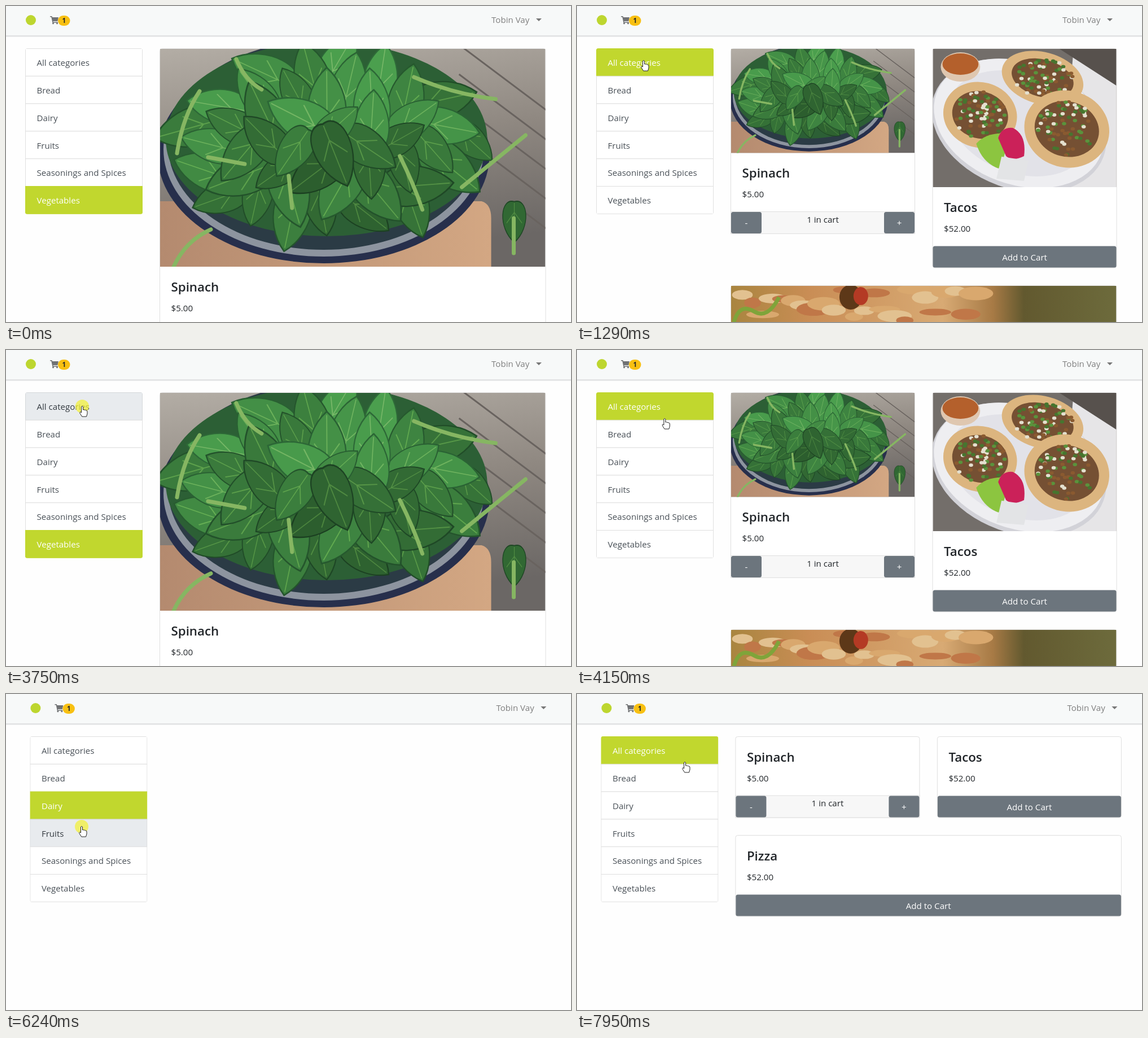
An HTML page that plays this animation: 1001x560 px, repeating every 8 s.

```html
<!DOCTYPE html>
<html lang="en">
<head>
<meta charset="utf-8">
<title>Shop categories</title>
<style>
html, body { margin: 0; width: 100%; height: 100%; overflow: hidden; background: #fefefe; }
svg { display: block; }
#stage { width: 1001px; height: 560px; }
text { font: 15.1px "Open Sans", "Noto Sans", sans-serif; fill: #212529; }
.title { font-size: 22.3px; font-weight: 600; }
.mid { text-anchor: middle; }
.btn rect { fill: #6c757d; }
.btn text { fill: #fff; }
.card { fill: #fff; stroke: #dfdfdf; }
.row rect { fill: #fff; stroke: #dfdfdf; }
.row text { fill: #495057; }
.row.hover rect { fill: #e8ebee; stroke: #d5d8db; }
.row.hover text { fill: #343a40; }
.row.on rect { fill: #c1d72e; stroke: #c1d72e; }
.row.on text { fill: #fff; }
.hide { display: none; }
</style>
</head>
<body>
<svg id="stage" viewBox="0 0 1001 560">
  <defs>
    <clipPath id="listClip"><rect x="34" y="75" width="208" height="294" rx="4"/></clipPath>
    <linearGradient id="wood" x2=".2" y2="1">
      <stop offset="0" stop-color="#b3ada5"/><stop offset=".5" stop-color="#8f8881"/>
      <stop offset="1" stop-color="#6b6765"/>
    </linearGradient>
    <linearGradient id="board" x2="1">
      <stop offset="0" stop-color="#b48a6f"/><stop offset="1" stop-color="#d3a783"/>
    </linearGradient>
    <linearGradient id="crust">
      <stop offset="0" stop-color="#a9853f"/><stop offset=".2" stop-color="#c98d55"/>
      <stop offset=".55" stop-color="#d8aa74"/><stop offset=".68" stop-color="#a77a45"/>
      <stop offset=".76" stop-color="#62592f"/><stop offset="1" stop-color="#6d6b3c"/>
    </linearGradient>
    <path id="leaf" d="M-.9 0C-1.1-.9 .3-1.1 1 0C.3 1.1-1.1 .9-.9 0Z"/>
    <symbol id="spinach" viewBox="0 0 683 386" preserveAspectRatio="none"></symbol>
    <symbol id="tacos" viewBox="0 0 326 245" preserveAspectRatio="none"></symbol>
    <symbol id="pizza" viewBox="0 0 683 386" preserveAspectRatio="none"></symbol>
  </defs>

  <g id="page">
    <path fill="#f7f9f9" d="M-20 0H1030V52H-20z"/>
    <path fill="#e1e2e3" d="M-20 52H1030V54.5H-20z"/>
    <circle cx="44" cy="25" r="9" fill="#bdd62f"/>
    <g fill="#707274">
      <path d="M78 18h3.5l.6 2H93l-1.6 7h-8l.3 1.3H92v1.4h-9.6L80.3 19.5H78z"/>
      <circle cx="83.5" cy="30.8" r="1.5"/><circle cx="90.5" cy="30.8" r="1.5"/>
    </g>
    <rect x="92" y="17" width="21.5" height="18" rx="9" fill="#f8c012"/>
    <text class="mid" x="102.8" y="30" style="font-size:11.5px;font-weight:700">1</text>
    <text x="860" y="30" style="fill:#7f7f7f">Tobin Vay</text>
    <path fill="#777" d="M939 22h10l-5 5z"/>
    <g id="list" clip-path="url(#listClip)"></g>
    <g id="veg"></g>
    <g id="all"></g>
    <g id="bare"></g>
  </g>

  <g id="mouse">
    <circle id="click" r="12" fill="#f3f03c" fill-opacity=".75"/>
    <path id="hand" fill="#fff" stroke="#222" stroke-linejoin="round"
      d="M-1.5 0.5Q0-1.5 1.5.5V6Q3 5 4.2 6.4Q5.8 5.6 6.8 7Q8.8 6.6 9 9V13L7.5 18H-.3L-3.8 12.5Q-5 10-3.3 9.6L-1.5 11z"/>
    <path id="arrow" fill="#fff" stroke="#222" d="M0 0V16L3.8 12.5 6.3 18.3 8.8 17.2 6.4 11.6H11.5z"/>
  </g>
</svg>
<script>
const $ = id => document.getElementById(id);
const TOP = 75.5, STEP = 48.8, LEFT = 34.5, WIDTH = 207, SHIFT = 8.4, LOOP = 8000, TICK = 77;

let seed = 7;
const rand = (lo = 0, hi = 1) => lo + (hi - lo) * ((seed = seed * 16807 % 2147483647) / 2147483647);
const repeat = (n, make) => Array.from({ length: n }, (_, i) => make(i)).join('');
const oval = (x, y, rx, ry, fill, turn = 0) =>
  `<ellipse rx="${rx}" ry="${ry}" fill="${fill}" transform="translate(${x} ${y}) rotate(${turn})"/>`;

// Spinach bowl: leaves spiral inwards, lighter towards the top
const leaf = (x, y, size, turn, light) => `<g transform="translate(${x} ${y}) rotate(${turn}) scale(${size} ${size * .72})">
  <use href="#leaf" fill="hsl(122 36% ${light}%)" stroke="hsl(130 40% ${light * .65}%)" stroke-width=".05"/>
  <path d="M-.85 0H.9M-.4 0L.1-.5M-.4 0L.1 .5" fill="none" stroke="hsl(108 36% ${light + 11}%)" stroke-width=".04"/></g>`;
const heap = n => repeat(n, i => {
  const r = Math.sqrt(1 - i / n), a = i * 2.4;
  const x = 295 + 258 * r * Math.cos(a), y = 165 + 148 * r * Math.sin(a);
  return leaf(x, y, rand(48, 68), a * 57.3 + rand(-50, 50), 43 - y / 24 + rand(-7, 7));
});
$('spinach').innerHTML = `<path fill="url(#wood)" d="M0 0h683v386H0z"/>
  <path stroke="#69635f" stroke-width="3" d="${repeat(5, i => `M${500 + i * 30} ${i * 75 - 30}l200 150`)}"/>
  <path fill="url(#board)" d="M0 270H570Q587 275 587 300V386H0z"/>
  ${oval(290, 188, 294, 192, '#272f4c')}${oval(290, 178, 284, 190, '#8d949f')}${oval(290, 170, 276, 186, '#2b3b45')}
  ${oval(295, 160, 285, 172, '#2c5f35')}
  ${heap(46)}${leaf(628, 305, 38, 90, 30)}
  <g fill="none" stroke="#86b662" stroke-width="7" stroke-linecap="round">
    <path d="M135 18Q150 55 180 72M450 50Q520 80 595 89M648 153L535 245M70 75Q40 120 30 185"/>
    <path d="M425 190Q450 240 465 285M85 192L150 204M228 225L234 282M90 320Q45 340 24 386M627 300V362"/>
  </g>`;

// Taco plate
const taco = (x, y, rx, ry) => oval(x, y, rx, ry, '#dcb57f', 15) + oval(x, y, rx * .76, ry * .72, '#755033', 15) +
  repeat(75, i => {
    const a = rand(0, 6.283), d = Math.sqrt(rand()) * .72;
    return oval(x + Math.cos(a) * d * rx, y + Math.sin(a) * d * ry, 3.8, 3, ['#e4e0cf', '#5a933c', '#8a5a30', '#47752f'][i % 4]);
  });
$('tacos').innerHTML = `<path fill="#736e6a" d="M0 0h326v245H0z"/>
  <path fill="#e6e5e7" d="M250 0H326V245H230z"/><path fill="#57514d" d="M225 0H326V65z"/>
  ${oval(153, 136, 160, 112, '#d2d2d8', 20)}${oval(153, 132, 156, 108, '#eeeef1', 20)}${oval(153, 132, 130, 88, '#e2e2e8', 20)}
  ${oval(49, 32, 35, 26, '#dfc7b0')}${oval(49, 27, 32, 19, '#b4602c')}
  ${taco(195, 52, 74, 46)}${taco(84, 117, 66, 58)}${taco(238, 142, 76, 68)}
  <path fill="#8cc540" d="M77 168Q95 148 128 150Q134 185 117 212Q88 202 77 168Z"/>
  <path fill="#cb2159" d="M116 158Q122 138 142 140Q167 152 162 190Q142 200 130 190Z"/>
  <path fill="#e3e4e6" d="M122 191L170 198 162 234 113 230Z"/>`;

$('pizza').innerHTML = `<path fill="url(#crust)" d="M0 0h683v386H0z"/>
  ${repeat(24, i => oval(20 + i * 18, rand(4, 64), rand(14, 32), rand(6, 12), ['#e2c190', '#c07748', '#d9a86e'][i % 3]))}
  ${oval(212, 20, 20, 22, '#5d3818')}${oval(230, 18, 13, 16, '#b43a24')}
  <path fill="none" stroke="#7fa43a" stroke-width="7" d="M5 64Q15 30 40 45T85 20"/>`;

// Product cards
const button = (x, y, w, label) => `<g class="btn"><rect x="${x}" y="${y}" width="${w}" height="38" rx="3.5"/>
  <text class="mid" x="${x + w / 2}" y="${y + 25}">${label}</text></g>`;
const card = (x, y, w, name, price, photo) => {
  const b = y + photo, f = b + 104.5, inCart = name == 'Spinach';
  return `<rect class="card" x="${x}" y="${y}" width="${w}" height="${photo + 143.5}" rx="4"/>
    ${photo ? `<use href="#${name.toLowerCase()}" x="${x + .5}" y="${y + .5}" width="${w - 1}" height="${photo}"/>` : ''}
    <text class="title" x="${x + 20}" y="${b + 44}">${name}</text>
    <text x="${x + 20}" y="${b + 79}">${price}</text>` + (inCart
    ? `<rect x="${x}" y="${f}" width="${w}" height="39" fill="#f7f7f7" stroke="#dfdfdf"/>
       ${button(x + .5, f + .5, 54, '-')}${button(x + w - 54.5, f + .5, 54, '+')}
       <text class="mid" x="${x + w / 2}" y="${f + 19}">1 in cart</text>`
    : button(x + .5, f + .5, w - 1, 'Add to Cart'));
};
const grid = (p1, p2, p3) => card(272.5, TOP, 326, 'Spinach', '$5.00', p1) +
  card(630, TOP, 326, 'Tacos', '$52.00', p2) + card(272.5, TOP + p2 + 175, 683.5, 'Pizza', '$52.00', p3);
$('veg').innerHTML = card(272.5, TOP, 683.5, 'Spinach', '$5.00', 386);
$('all').innerHTML = grid(184.5, 245, 386);
$('bare').innerHTML = grid(0, 0, 0);

$('list').innerHTML = ['All categories', 'Bread', 'Dairy', 'Fruits', 'Seasonings and Spices', 'Vegetables']
  .map((name, i) => `<g class="row"><rect x="${LEFT}" y="${TOP + i * STEP}" width="${WIDTH}" height="${STEP}"/>
    <text x="54.5" y="${106.2 + i * STEP}">${name}</text></g>`).join('');
const rows = [...$('list').children];
const rowAt = y => Math.floor((y - TOP) / STEP);

// Each stop: move from/to in ms, goal, then click and page load if any
const stops = [
  { from: 210, to: 990, x: 118, y: 97, click: 1060, load: 1210 },
  { from: 2070, to: 2600, x: 123, y: 346, click: 2600, load: 2830 },
  { from: 3290, to: 3600, x: 135, y: 100, click: 3750, load: 3900 },
  { from: 4150, to: 4530, x: 410, y: 397 },
  { from: 4610, to: 4920, x: 152, y: 233 },
  { from: 5000, to: 5150, x: 142, y: 208, click: 5230, load: 5400 },
  { from: 5560, to: 5940, x: 134, y: 235, click: 6240, load: 6400 },
  { from: 6570, to: 6880, x: 150, y: 300, click: 7020, load: 7170 },
  { from: 7250, to: 7710, x: 191, y: 121, click: 7790, load: 7880 }
];

function stateAt(t) {
  const s = { x: 492, y: 478, active: 5, clicked: false, short: false };
  for (const { from, to, x, y, click, load } of stops) {
    if (t < from) break;
    const steps = Math.round((to - from) / TICK) + 1;
    const p = Math.min(1, (Math.floor((t - from) / TICK + .05) + 1) / steps);
    const ease = p * p * (3 - 2 * p);
    s.x += (x - s.x) * ease;
    s.y += (y - s.y) * ease;
    if (t >= click && t < Math.min(click + 170, load) && t < click + 150 + TICK / 4) s.clicked = true;
    if (t >= load) {
      s.active = rowAt(y);
      // An empty page drops the scrollbar, which moves everything right
      s.short ||= s.active > 0 && s.active < 5;
    }
  }
  return s;
}
const show = (id, on) => $(id).classList.toggle('hide', !on);

function draw(now) {
  const t = now % LOOP;
  const { x, y, active, clicked, short } = stateAt(t);
  const dx = short ? SHIFT : 0;
  const inside = t >= stops[0].from && x > LEFT + dx && x < LEFT + WIDTH + dx;
  const over = inside ? rowAt(y) : -1;

  $('page').setAttribute('transform', `translate(${dx} 0)`);
  $('mouse').setAttribute('transform', `translate(${x} ${y})`);
  show('veg', active == 5);
  show('all', active == 0 && !short);
  show('bare', active == 0 && short);
  rows.forEach((row, i) => {
    row.classList.toggle('on', i == active);
    row.classList.toggle('hover', i == over && i != active);
  });
  show('mouse', t >= stops[0].from);
  show('hand', over in rows);
  show('arrow', !(over in rows));
  show('click', clicked);
  requestAnimationFrame(draw);
}
draw(0);
</script>
</body>
</html>
```
